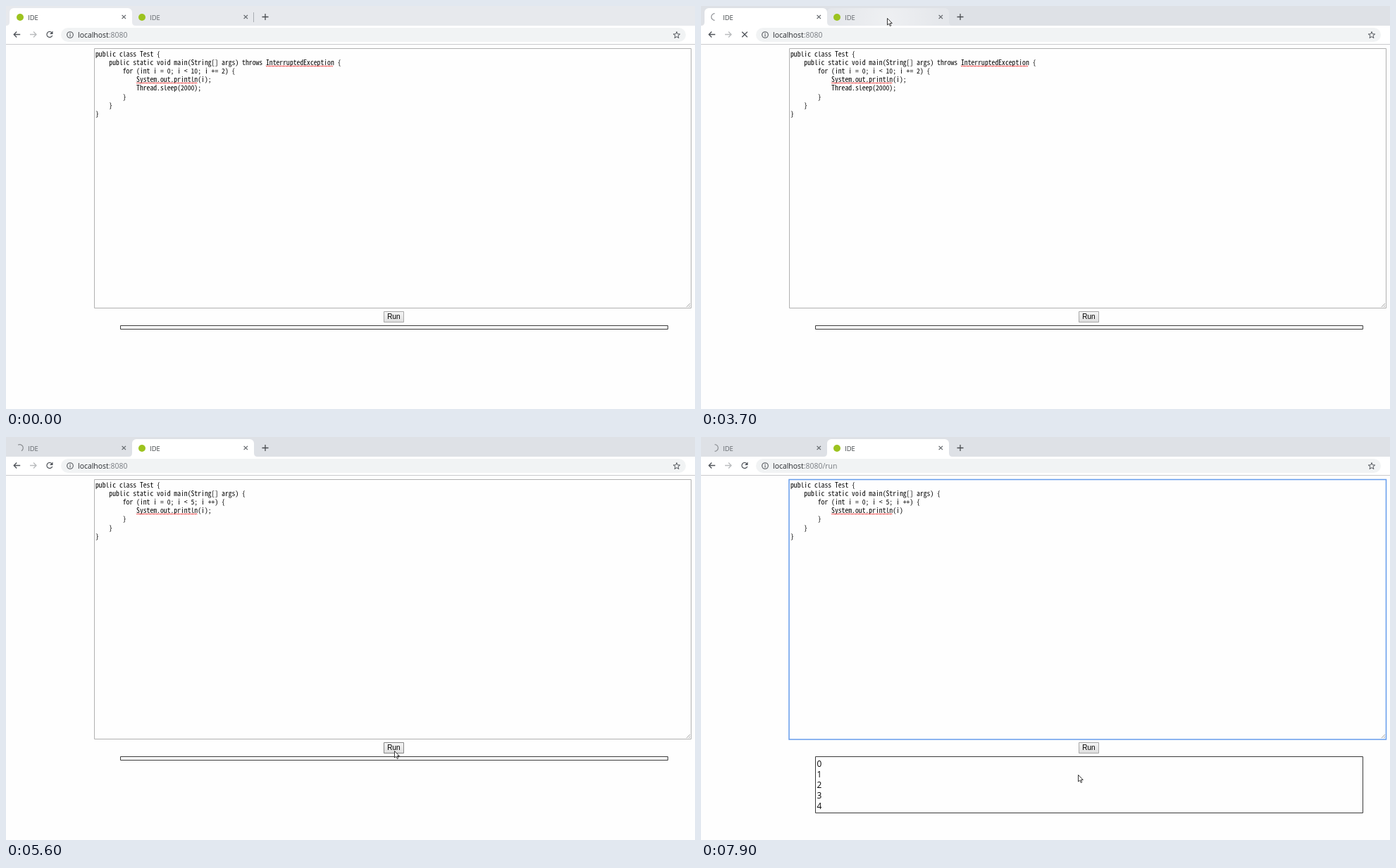
An HTML page with a canvas that plays this animation: 978 px wide and 573 px high, repeating every 8 s.

```html
<!DOCTYPE html>
<html lang="en">
<head>
<meta charset="utf-8">
<title>IDE</title>
<style>
html, body { margin: 0; width: 100%; height: 100%; overflow: hidden; background: #fefefe; }
canvas { display: block; }
</style>
</head>
<body>
<canvas id="stage" width="978" height="573"></canvas>
<script>
const ctx = document.getElementById('stage').getContext('2d');
const LOOP = 8000, STEP = 100;
const PITCH = 4.84, LINE = 12.1, CODE_X = 127;
const INK = '#50545a', PAPER = '#fefefe';
const UI = '"Open Sans", "Noto Sans", sans-serif';
const MONO = '9.68px "Noto Sans Mono CJK JP", "Noto Sans Mono CJK KR", "Noto Sans Mono", monospace';

// moments of the session in ms
const AT = {
  enter: 300, runFirst: 1900, activate: 3700, swap: 3800, focus: 4300,
  runSecond: 5500, request: 5700, answer: 5900, refocus: 7000, erase: 7300
};

const program = (signature, loop, ...body) => [
  'public class Test {',
  `    public static void main(String[] args) ${signature}{`,
  `        for (${loop}) {`,
  ...body.map(row => '            ' + row),
  '        }', '    }', '}'
];
const PRINT = 'System.out.println(i);';
const SLOW = program('throws InterruptedException ', 'int i = 0; i < 10; i += 2', PRINT, 'Thread.sleep(2000);');
const FAST = program('', 'int i = 0; i < 5; i ++', PRINT);

// pointer moves: from, until, destination
const RUN = [551, 446];
const MOVES = [
  [AT.enter, 600, [383, 309]],
  [800, 1500, RUN],
  [AT.runFirst, 2200, [335, 219]],
  [2200, 2400, [308, 141]],
  [2900, 3500, [264, 17]],
  [AT.swap, 4200, [254, 110]],
  [4600, 5300, RUN],
  [AT.request, 6500, [300, 107]],
  [7400, 7700, [535, 480]]
];

const between = (t, a, b) => t >= a && t < b;
const smooth = k => k * k * (3 - 2 * k);

function pointer(t) {
  if (t < AT.enter || between(t, AT.erase, 7500)) return null;
  let [x, y] = [469, 150];
  for (const [from, until, [toX, toY]] of MOVES) {
    if (t < from) break;
    const k = smooth(Math.min(1, (t - from) / (until - from)));
    x += (toX - x) * k;
    y += (toY - y) * k;
  }
  return { x: Math.round(x), y: Math.round(y) };
}

const inside = (p, x, y, w, h) => !!p && between(p.x, x, x + w) && between(p.y, y, y + h);

function poly(points, close) {
  points.forEach(([x, y], i) => i ? ctx.lineTo(x, y) : ctx.moveTo(x, y));
  if (close) ctx.closePath();
}

function stroke(color, width, build) {
  ctx.strokeStyle = color;
  ctx.lineWidth = width;
  ctx.beginPath();
  build();
  ctx.stroke();
}

function fill(color, build) {
  ctx.fillStyle = color;
  ctx.beginPath();
  build();
  ctx.fill();
}

const lines = (color, width, ...shapes) => stroke(color, width, () => shapes.forEach(s => poly(s)));
const frame = (color, width, ...rect) => stroke(color, width, () => ctx.rect(...rect));
const circle = (x, y, r) => ctx.arc(x, y, r, 0, 2 * Math.PI);

function text(str, x, y, font, color, align = 'left') {
  ctx.font = font;
  ctx.fillStyle = color;
  ctx.textAlign = align;
  ctx.fillText(str, x, y);
}

function cross(x, y, r, color, width) {
  lines(color, width, [[x - r, y - r], [x + r, y + r]], [[x - r, y + r], [x + r, y - r]]);
}

function arrow(x, dir, color) {
  const tip = x + 4.5 * dir;
  lines(color, 1.3, [[x - 4.5 * dir, 40.5], [tip, 40.5]],
    [[tip - 4 * dir, 36.5], [tip, 40.5], [tip - 4 * dir, 44.5]]);
}

function tabShape(x, w) {
  ctx.roundRect(x, 3, w, 25, [6, 6, 0, 0]);
  for (const [edge, dir] of [[x, -1], [x + w, 1]]) {
    ctx.moveTo(edge, 23);
    ctx.quadraticCurveTo(edge, 28, edge + 5 * dir, 28);
    ctx.lineTo(edge, 28);
  }
}

// grey arc turning counter-clockwise, growing from 12 o'clock
function spinner(x, age) {
  const top = Math.PI / 2;
  const end = top + age / 1200 * 2 * Math.PI;
  const start = Math.max(top, end - Math.PI);
  stroke('#8b8e92', 1.2, () => ctx.arc(x, 15.5, 4.8, -start, -end, true));
}

function drawTabs(s) {
  fill(s.t < AT.activate ? '#e7e9ed' : '#dee1e6', () => ctx.rect(0, 0, 978, 28));
  if (s.overTab) {
    const glow = ctx.createRadialGradient(s.p.x, s.p.y, 0, s.p.x, s.p.y, 80);
    glow.addColorStop(0, 'rgba(255,255,255,.5)');
    glow.addColorStop(1, 'rgba(255,255,255,.2)');
    fill(glow, () => tabShape(179, 173));
  }
  fill('#fff', () => s.second ? tabShape(179, 173) : tabShape(5, 174));
  if (!s.second && !s.overTab) lines('#a9adb2', 1, [[351.5, 9], [351.5, 23]]);

  [s.t - AT.runFirst, s.loading ? s.t - AT.request : -1].forEach((age, i) => {
    const x = 173 * i, active = s.second === (i === 1);
    if (age >= 0) spinner(x + 19.5, age);
    else fill('#9cc31f', () => circle(x + 20, 16, 5));
    text('IDE', x + 31, 19.5, '9.5px ' + UI, active ? '#3c4043' : '#5f6368');
    cross(x + 167.3, 15.5, 2.7, '#5f6368', 1.2);
  });
  lines('#4a4d51', 1.3, [[363.5, 15.5], [372.5, 15.5]], [[368, 11], [368, 20]]);
}

function star() {
  const points = Array.from({ length: 10 }, (_, i) => {
    const a = i * Math.PI / 5 - Math.PI / 2, r = i % 2 ? 2.1 : 5;
    return [952 + r * Math.cos(a), 41.5 + r * Math.sin(a)];
  });
  stroke(INK, 1, () => poly(points, true));
}

function drawBar(s) {
  fill('#fff', () => ctx.rect(0, 28, 978, 26));
  lines('#c9cacc', 1, [[0, 54.5], [978, 54.5]]);
  arrow(15.7, -1, INK);
  arrow(38.5, 1, '#babcbe');
  if (s.loading || (s.t >= AT.runFirst && !s.second)) {
    cross(62, 40.5, 3.8, INK, 1.3);
  } else {
    stroke(INK, 1.3, () => ctx.arc(62, 40.5, 4, .35, 5.5));
    fill(INK, () => poly([[66.5, 35.5], [66.5, 40], [62, 40]], true));
  }
  fill(s.overBar ? '#e8eaed' : '#f1f3f4', () => ctx.roundRect(78, 31, 887, 20, 10));
  stroke(INK, 1.1, () => circle(91, 41, 4.3));
  lines(INK, 1.1, [[91, 40.3], [91, 43.5]], [[91, 38.3], [91, 39.4]]);
  star();

  const font = '10.45px ' + UI, host = 'localhost';
  text(host, 102, 44.5, font, '#26292d');
  text(s.done ? ':8080/run' : ':8080', 102 + ctx.measureText(host).width, 44.5, font, '#777b80');
}

const baseline = row => Math.round(72 + row * LINE);

function squiggle(rows, word) {
  const row = rows.findIndex(r => r.includes(word));
  if (row < 0) return;
  const x = CODE_X + rows[row].indexOf(word) * PITCH, y = baseline(row) + 1.5;
  const count = Math.round(word.length * PITCH / 1.25);
  lines('#ee3030', .9, Array.from({ length: count }, (_, i) => [x + i * 1.25, y + (i % 2 ? .7 : -.7)]));
}

function drawCode(s) {
  const erased = s.t >= AT.erase;
  const rows = s.second ? FAST.map(r => erased ? r.replace(';\n', '') : r) : SLOW;
  if (erased) rows[3] = rows[3].slice(0, -1);

  ctx.font = MONO;
  ctx.letterSpacing = '0px';
  ctx.letterSpacing = PITCH - ctx.measureText('0').width + 'px';
  rows.forEach((row, i) => {
    const code = row.trimStart();
    text(code, CODE_X + (row.length - code.length) * PITCH, baseline(i), MONO, '#000');
  });
  ctx.letterSpacing = '0px';

  if (!between(s.t, AT.answer, AT.refocus)) {
    squiggle(rows, 'InterruptedException');
    squiggle(rows, 'System.out.println');
  }
  if (s.focus) {
    const since = s.t - (s.t < AT.runSecond ? AT.focus : erased ? AT.erase : AT.refocus);
    const col = s.t < AT.runSecond ? 26 : rows[3].length;
    const x = Math.floor(CODE_X + col * PITCH);
    if (since % 1100 < 550) fill('#000', () => ctx.rect(x, 99, 1, 12));
  }
}

function drawPage(s) {
  if (s.focus) frame('#659cec', 1.5, 125, 60.5, 847.5, 369.5);
  else frame('#b0b0b0', 1, 125.5, 60.5, 847, 369);
  lines('#8c8c8c', .8, [[966, 428], [971, 423]], [[969, 428], [971, 426]]);
  drawCode(s);

  const face = ctx.createLinearGradient(0, 434, 0, 450);
  face.addColorStop(0, s.pressed ? '#dedede' : '#f6f6f6');
  face.addColorStop(1, s.pressed ? '#eeeeee' : '#dddddd');
  fill(face, () => ctx.rect(536, 434, 29, 16));
  frame(s.overRun ? '#888' : '#a9a9a9', 1, 536.5, 434.5, 28, 15);
  text('Run', 550.5, 445, '10px "Liberation Sans", Arial, sans-serif', '#000', 'center');

  frame('#3a3a3a', 1, 162.5, 454.5, 777, s.done ? 80 : 5);
  for (let i = 0; s.done && i < 5; i++) text(i, 164.6, 468.7 + i * 15.1, '11.9px ' + UI, '#000');
}

function drawPointer(s) {
  if (!s.p) return;
  const x = s.p.x + .5, y = s.p.y + .5;
  if (s.overText || s.overBar) {
    lines('#333', 1, [[x, y - 4], [x, y + 4]],
      ...[-4, 4].map(dy => [[x - 2.5, y + dy], [x + 2.5, y + dy]]));
    return;
  }
  const outline = () => {
    ctx.moveTo(x, y);
    poly([[0, 0], [0, 9.5], [2.2, 7.5], [3.8, 11], [5.3, 10.3], [3.8, 7], [6.8, 7]]
      .map(([dx, dy]) => [x + dx, y + dy]), true);
  };
  fill('#fff', outline);
  stroke('#222', .9, outline);
}

function draw(now) {
  const t = Math.floor(now % LOOP / STEP) * STEP;
  const p = pointer(t), second = t >= AT.swap;
  const s = {
    t, p, second,
    focus: between(t, AT.focus, AT.runSecond) || t >= AT.refocus,
    pressed: between(t, AT.runFirst - STEP, AT.runFirst) || between(t, AT.runSecond, AT.runSecond + STEP),
    loading: between(t, AT.request, AT.answer),
    done: t >= AT.answer,
    overTab: !second && inside(p, 179, 3, 173, 25),
    overBar: inside(p, 78, 31, 887, 20),
    overText: inside(p, 125, 60, 848, 370),
    overRun: inside(p, 536, 434, 29, 16)
  };
  fill(PAPER, () => ctx.rect(0, 0, 978, 573));
  drawTabs(s);
  drawBar(s);
  drawPage(s);
  drawPointer(s);
}

const begin = performance.now();
function tick() {
  draw(performance.now() - begin);
  requestAnimationFrame(tick);
}
tick();
</script>
</body>
</html>
```
